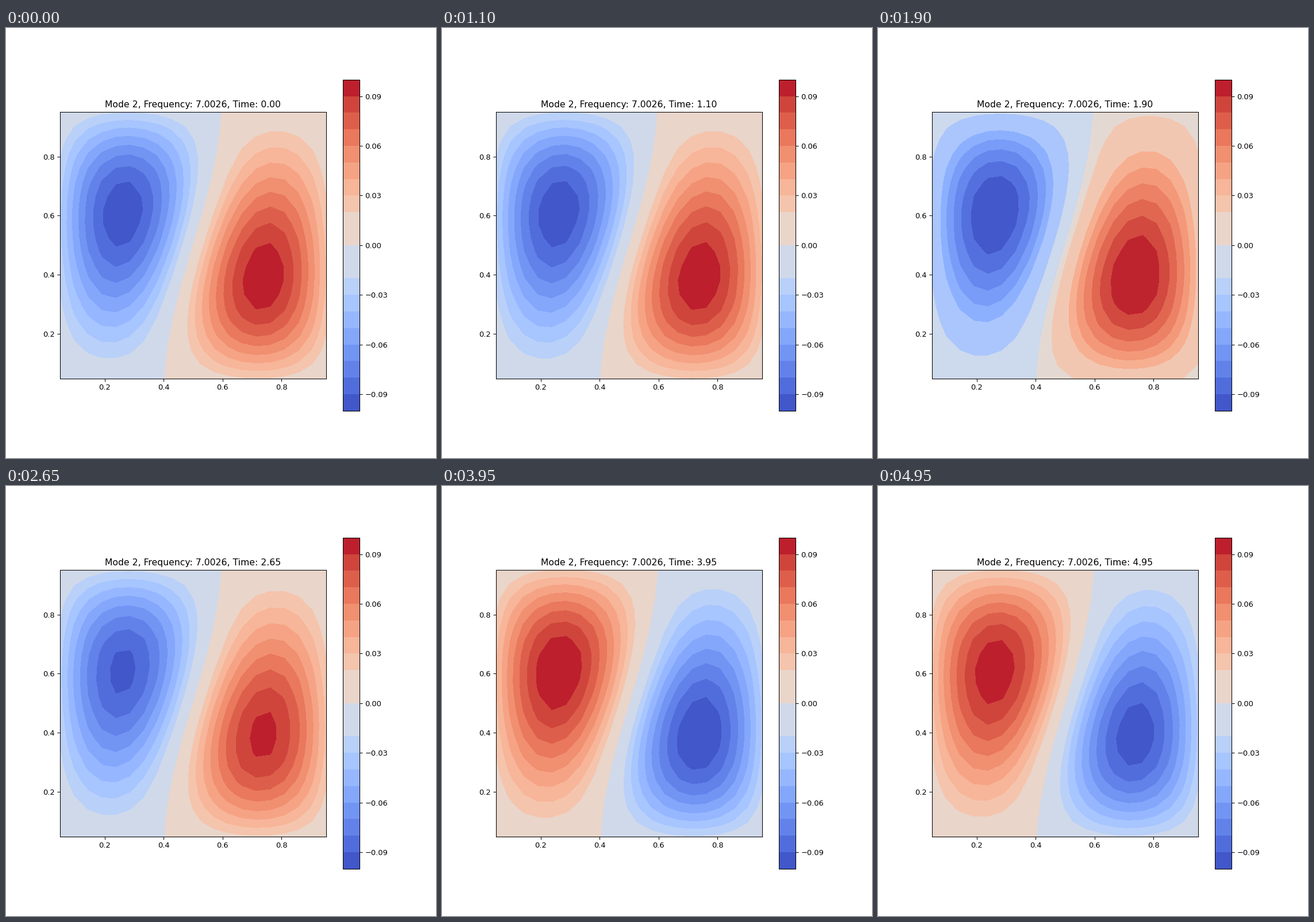
A matplotlib script for the animation above (5 s loop, 748x748 px).

```python
import numpy as np
import matplotlib.pyplot as plt
from matplotlib.animation import FuncAnimation
from matplotlib.colors import ListedColormap

N = 20                # interior grid points per side
FRAMES, STEP = 100, 0.05
MIX = 0.299           # share of the second degenerate mode

h = 1 / (N + 1)
grid = np.arange(1, N + 1) * h
X, Y = np.meshgrid(grid, grid)

# Eigenpair of the discrete Laplacian on the unit square
omega = 2 / h * np.hypot(np.sin(np.pi * h / 2), np.sin(np.pi * h))
mode = (MIX * np.sin(np.pi * X) * np.sin(2 * np.pi * Y)
        - np.sin(2 * np.pi * X) * np.sin(np.pi * Y))
mode /= np.linalg.norm(mode)


def band_map(n):
    """Coolwarm in n bands, with pale neighbours near zero joined in pairs."""
    colors = plt.get_cmap("coolwarm")((np.arange(n) + 0.5) / n)
    starts = (-2, 0) if n >= 20 else (-4, -2, 1)
    for k in starts:
        pair = slice(n // 2 + k, n // 2 + k + 2)
        colors[pair] = colors[pair].mean(axis=0)
    return ListedColormap(colors)


fig, ax = plt.subplots(figsize=(8, 8), dpi=93.5)
ax.set_aspect("equal")
current = None


def draw(i):
    global current
    if current is not None:
        current.remove()
    t = i * STEP
    current = ax.contourf(X, Y, mode * np.cos(omega * t), 20)
    current.set_cmap(band_map(len(current.levels) - 1))
    ax.set_title(f"Mode 2, Frequency: {omega:.4f}, Time: {t:.2f}")
    return [current]


draw(0)
fig.colorbar(current, ax=ax)

anim = FuncAnimation(fig, draw, frames=FRAMES, interval=1000 * STEP,
                     init_func=lambda: draw(0), repeat=True, blit=False)
plt.show()
```
